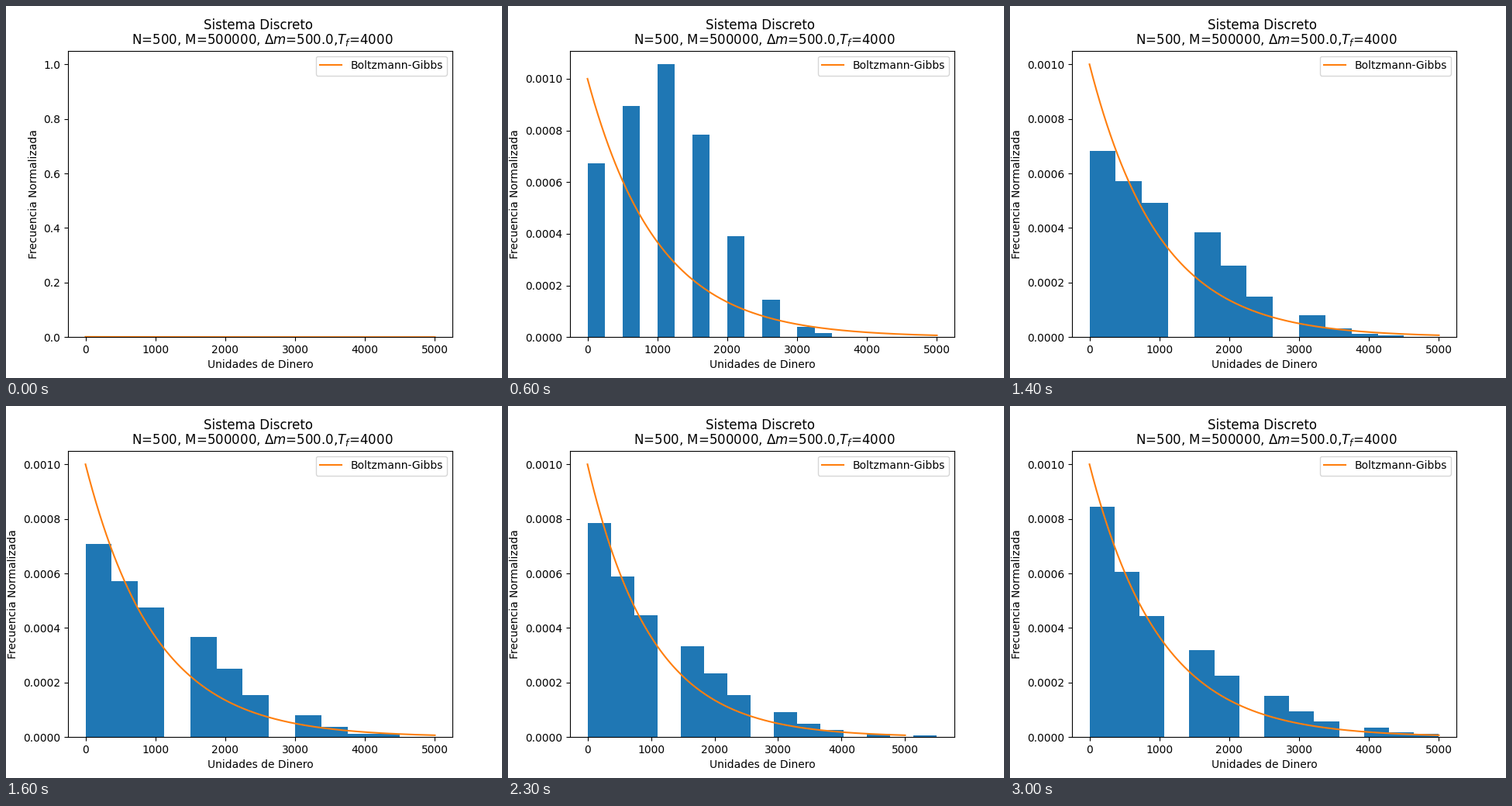
Animation, 640 px wide and 480 px high, one loop 4.6 s. Source, as a matplotlib script:

```python
import numpy as np
import matplotlib.pyplot as plt
from matplotlib.animation import FuncAnimation

AGENTS, STEP, MEAN = 500, 500.0, 1000.0
LAST, TOTAL = 30, 46  # the final state is held until the loop ends
RATE = 0.23           # payments per agent and frame
SUBSTEPS, LEVELS = 50, 40

# Path of the richest agent: (frame, money in steps)
RICHEST = np.array([(0, 2), (1, 4), (3, 6), (11, 9), (20, 10), (25, 13), (30, 10)])


def exchange(p, dt):
    """Advance the share of agents at each money level by random payments."""
    payers = p.copy()
    payers[0] = 0  # agents without money cannot pay
    gain = p * payers.sum()
    gain[-1] = 0
    flow = np.roll(gain, 1) - gain + np.roll(payers, -1) - payers
    return p + dt * flow


def evolve():
    p = np.zeros(LEVELS)
    p[int(MEAN / STEP)] = 1
    states = [p]
    for _ in range(LAST):
        for _ in range(SUBSTEPS):
            p = exchange(p, RATE / SUBSTEPS)
        states.append(p)
    return states


STATES = evolve()
RANKS = (np.arange(AGENTS) + 0.5) / AGENTS


def money(t):
    """Money of every agent, poorest first, always a multiple of STEP."""
    top = int(np.interp(t, *RICHEST.T))
    level = np.searchsorted(np.cumsum(STATES[t]), RANKS)
    level = np.minimum(level, top)
    level[-1] = top
    return STEP * level


fig, ax = plt.subplots(figsize=(6.4, 4.8), dpi=100)
x = np.linspace(0, 5000, 200)
boltzmann = np.exp(-x / MEAN) / MEAN


def draw(n):
    ax.clear()
    ax.hist(money(min(n, LAST)), bins="auto", density=True, color="C0")
    ax.plot(x, boltzmann, color="C1", label="Boltzmann-Gibbs")
    ax.set_title("Sistema Discreto \n"
                 r" N=500, M=500000, $\Delta m$=500.0,$T_f$=4000",
                 linespacing=1.05)
    ax.set_xlabel("Unidades de Dinero")
    ax.set_ylabel("Frecuencia Normalizada")
    ax.legend(loc="upper right")
    return []


anim = FuncAnimation(fig, draw, frames=TOTAL, interval=100,
                     init_func=lambda: draw(0), repeat=True, repeat_delay=0)
plt.show()
```
